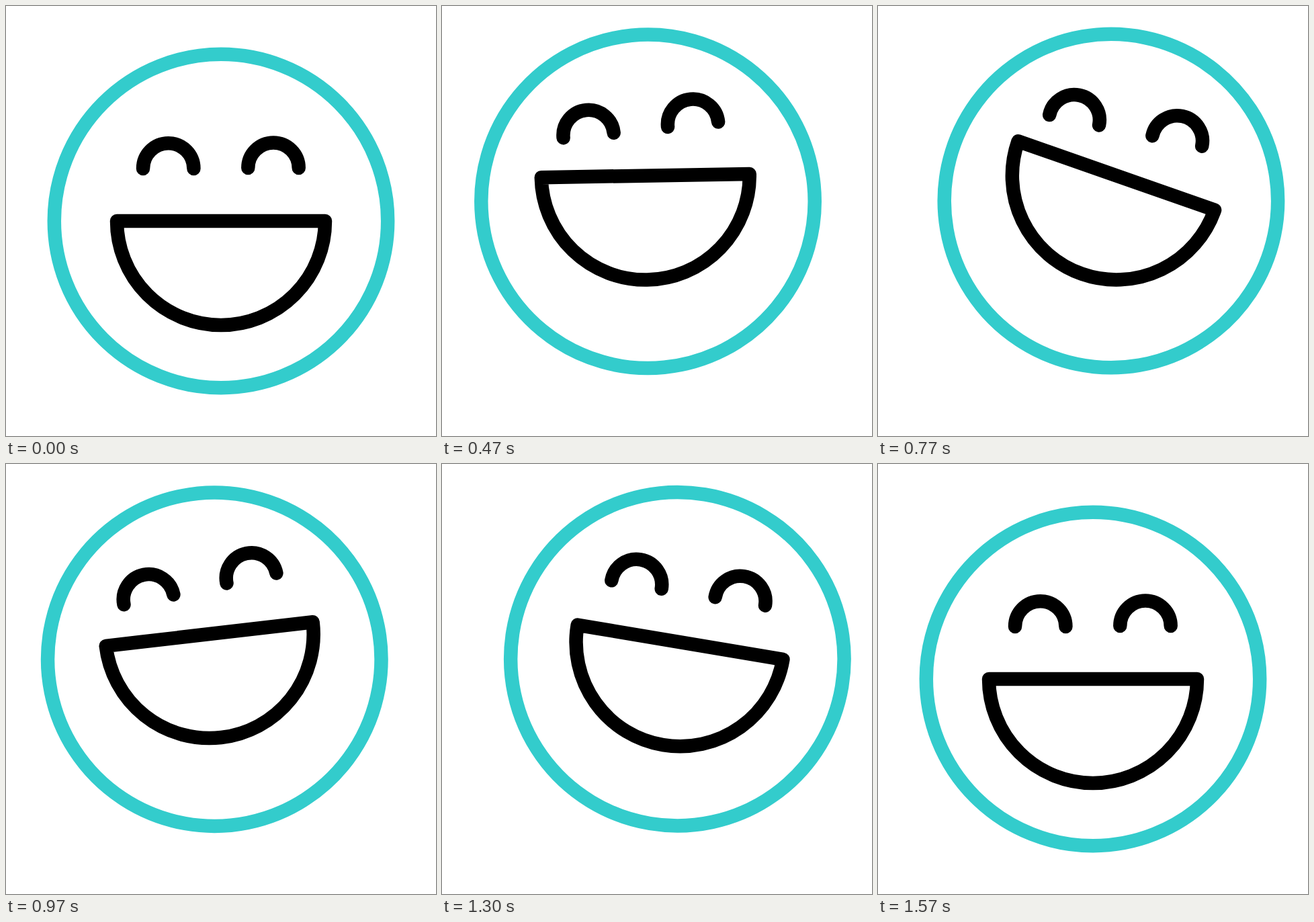
Recreate the animation shown at these times as an HTML page. Size 640x640 px, loop 2000 ms.

```html
<!DOCTYPE html>
<html lang="en">
<head>
<meta charset="utf-8">
<title>Laughing face</title>
<style>
  html, body { margin: 0; width: 100%; height: 100%; overflow: hidden; background: #fff; }
  svg { display: block; width: 100%; height: 100%; }
</style>
</head>
<body>
<svg viewBox="0 0 640 640" fill="none" stroke="#000" stroke-width="20.5" stroke-linecap="round" stroke-linejoin="round">
  <g id="head">
    <circle r="248.2" stroke="#33cccc"/>
    <path id="eyes" d="M-116-78a37.7 37.7 0 0 1 75.4 0M40.3-78.9a37.7 37.7 0 0 1 75.4 0"/>
    <path id="mouth" d="M-155 0H155A155 155 0 0 1-155 0Z"/>
  </g>
</svg>
<script>
const LOOP = 2000, REST = 47;       // the head is at rest from step 47 on
const PIVOT = { x: 4, y: 105 };     // rocking point, relative to the head's centre
// Extremes of the rocking: [step, degrees]
const SWINGS = [[0, 0], [8.6, 14], [17.6, -16.3], [23.5, 12.4], [31.9, -20.5], [39, 9.5], [REST, 0]];

// Smooth 0 to 1 while n goes from a to b
function ease(n, a, b) {
  const u = Math.min(1, Math.max(0, (n - a) / (b - a)));
  return u * u * (3 - 2 * u);
}

// Rises from step 0 to up, holds, then falls from down to end
const pulse = (n, up, down, end = REST) => ease(n, 0, up) * (1 - ease(n, down, end));

// Each swing eases from one extreme to the next
const tilt = n => SWINGS.slice(1).reduce(
  (sum, [step, angle], i) => sum + (angle - SWINGS[i][1]) * ease(n, SWINGS[i][0], step), 0);

const [head, eyes, mouth] = ["head", "eyes", "mouth"].map(id => document.getElementById(id));
const place = (el, x, y, turn = 0) =>
  el.setAttribute("transform", `translate(${x.toFixed(2)} ${y.toFixed(2)}) rotate(${turn.toFixed(2)})`);

function draw(ms) {
  // 30 steps a second, on a 10 ms clock
  const n = Math.floor(Math.floor(ms / 10) * 0.3 + 0.15);
  const turn = tilt(n), rad = turn * Math.PI / 180;
  const sin = Math.sin(rad), lag = 1 - Math.cos(rad);

  // The head hops up, then drifts slowly up and to the right
  const x = 320 + pulse(n, 8, 39.5) * (17.5 * ease(n, 10, 34) - 4.5);
  const y = 320 - pulse(n, 8, 37.2) * (28.15 + 0.139 * n);
  place(head, x + PIVOT.y * sin + PIVOT.x * lag, y + PIVOT.y * lag - PIVOT.x * sin, turn);

  place(eyes, 0, -28.5 * pulse(n, 8, 35));
  place(mouth, 0, -38.4 * pulse(n, 8, 35, 45.2), 7.5 * pulse(n, 24, 24, 36.5));
}

const start = performance.now();
function tick() {
  draw((performance.now() - start) % LOOP);
  requestAnimationFrame(tick);
}
tick();
</script>
</body>
</html>
```
